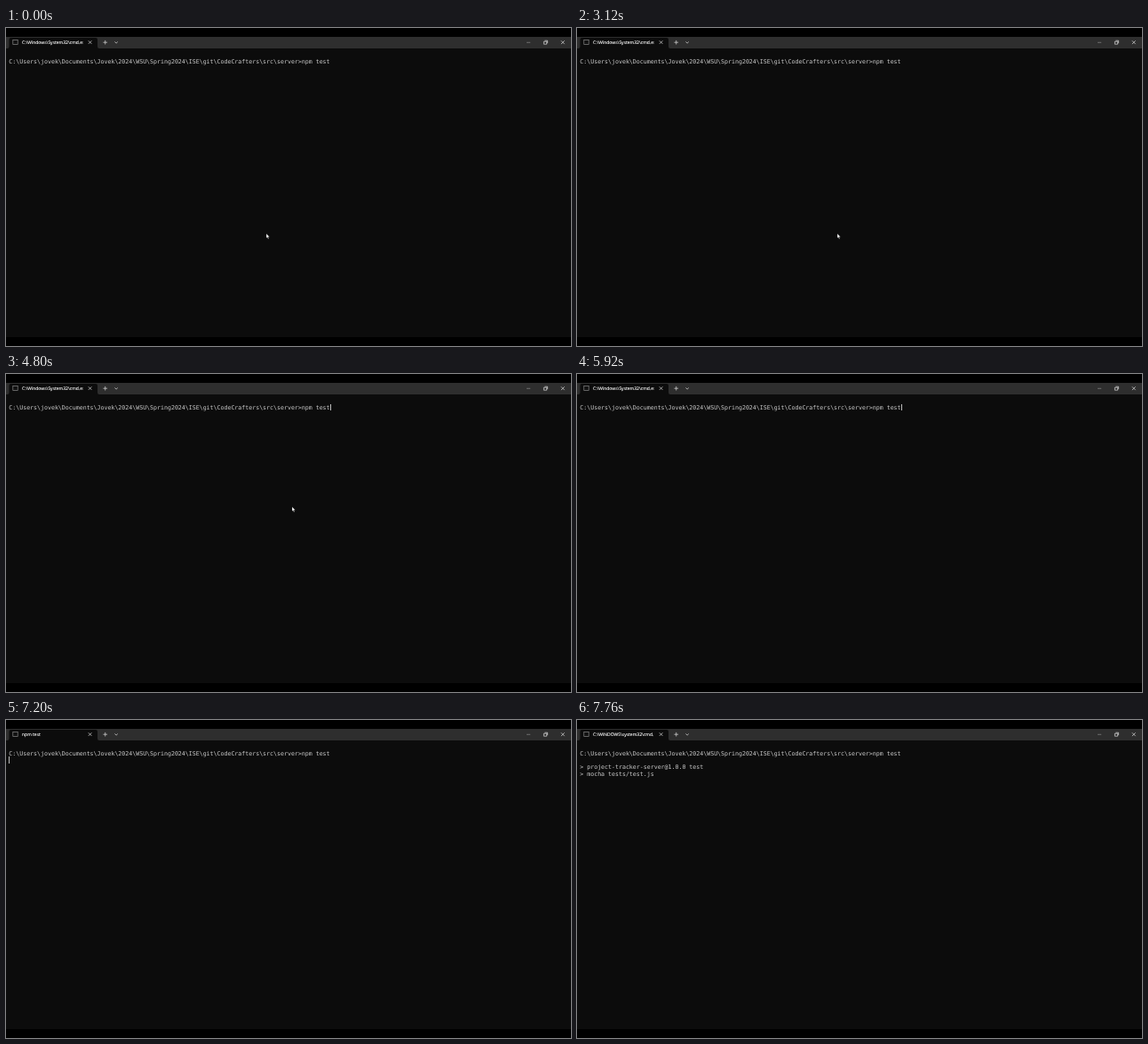
Animation, 636 px wide and 358 px high, one loop 8 s. Source, as an HTML page:

```html
<!DOCTYPE html>
<html lang="en">
<head>
<meta charset="utf-8">
<title>Terminal</title>
<style>
  html, body { margin: 0; width: 100%; height: 100%; overflow: hidden; background: #000; }
  svg { display: block; width: 636px; height: 358px; }
  text { white-space: pre; text-rendering: geometricPrecision; }
  .term { font: 6.606px "DejaVu Sans Mono", monospace; fill: #ccc; }
  .title { font: 5px "Open Sans", "Noto Sans", sans-serif; fill: #fff; stroke: #fff; stroke-width: .12px; }
  .line { fill: none; stroke: #ddd; stroke-width: .7px; }
</style>
</head>
<body>
<svg viewBox="0 0 636 358">
  <defs><clipPath id="titleClip"><rect x="17" y="11" width="69.5" height="11"/></clipPath></defs>
  <rect width="636" height="358" fill="#000"/>
  <rect y="10" width="636" height="13" fill="#2e2e2e"/>
  <rect y="23" width="636" height="325" fill="#0c0c0c"/>
  <path d="M1.5 23Q3.5 23 3.5 21V13Q3.5 11 5.5 11H101Q103 11 103 13V21Q103 23 105 23Z" fill="#0c0c0c"/>
  <rect x="7.8" y="13.6" width="5.4" height="4.8" fill="#111" stroke="#888" stroke-width=".7"/>
  <g clip-path="url(#titleClip)"><text id="title" class="title" x="18" y="18"/></g>
  <path class="line" d="M92.8 14.3l3.6 3.6M96.4 14.3l-3.6 3.6"/>
  <path class="line" d="M109.4 16.2h4.6M111.7 13.9v4.6"/>
  <path class="line" d="M122.4 15.5l1.7 1.6 1.7-1.6"/>
  <path class="line" d="M586 16.3h4.2" style="stroke:#888"/>
  <path class="line" d="M605.4 15.2h3.2v3h-3.2zM606.4 14.2h3.2v3"/>
  <path class="line" d="M624.9 14.3l3.8 3.8M628.7 14.3l-3.8 3.8"/>
  <g id="lines" class="term"></g>
  <rect id="caret" width="1" fill="#bbb"/>
  <path id="mouse" d="M0 0V5.2L1.2 4.2 2 6 2.9 5.6 2.1 3.9H3.7Z" fill="#fff" stroke="#000" stroke-width=".3"/>
</svg>
<script>
const LOOP = 8000, LEFT = 3.3, TOP = 34, ROW = 7.62;
const $ = id => document.getElementById(id);

const prompt = "C:\\Users\\jovek\\Documents\\Jovek\\2024\\WSU\\Spring2024\\ISE\\git\\CodeCrafters\\src\\server>npm test";
const output = [[2, "> project-tracker-server@1.0.0 test"], [3, "> mocha tests/test.js"]];

// Each table holds [start ms, value].
const titles = [
  [0, "C:\\Windows\\System32\\cmd.exe"],
  [6160, "npm"],
  [6640, "npm prefix"],
  [6720, "npm test"],
  [7520, "C:\\WINDOWS\\system32\\cmd."]
];
const mousePath = [
  [0, [293, 231.4]],
  [4560, [295, 225]],
  [4640, [306, 195]],
  [4720, [317, 163]],
  [4800, [322, 149.4]],
  [5280, null]
];
const caretRows = [[0, 0], [6000, 1], [7440, 5]];
const blinks = [400, 960, 1520, 2000, 2560, 3120, 3760, 4240, 4800, 5360, 5920, 6560, 7120, 7760];

const at = (steps, t) => steps.filter(step => step[0] <= t).pop()[1];

function addLine(row, content) {
  const line = document.createElementNS("http://www.w3.org/2000/svg", "text");
  line.setAttribute("x", LEFT);
  line.setAttribute("y", TOP + row * ROW + 6);
  line.textContent = content;
  $("lines").append(line);
  return line;
}

function show(el, on) {
  el.style.visibility = on ? "visible" : "hidden";
}

addLine(0, prompt);
const outputLines = output.map(([row, content]) => addLine(row, content));

function draw(t) {
  $("title").textContent = at(titles, t);
  outputLines.forEach(line => show(line, t >= 7440));

  const row = at(caretRows, t);
  const top = Math.round(TOP + row * ROW - .4);
  $("caret").setAttribute("x", row ? 3 : 365);
  $("caret").setAttribute("y", top);
  $("caret").setAttribute("height", row ? 8 : 7);
  show($("caret"), blinks.filter(b => b <= t).length % 2);

  const pos = at(mousePath, t);
  show($("mouse"), pos);
  if (pos) $("mouse").setAttribute("transform", `translate(${pos})`);
}

const start = performance.now();
function tick() {
  draw((performance.now() - start) % LOOP);
  requestAnimationFrame(tick);
}
tick();
</script>
</body>
</html>
```
